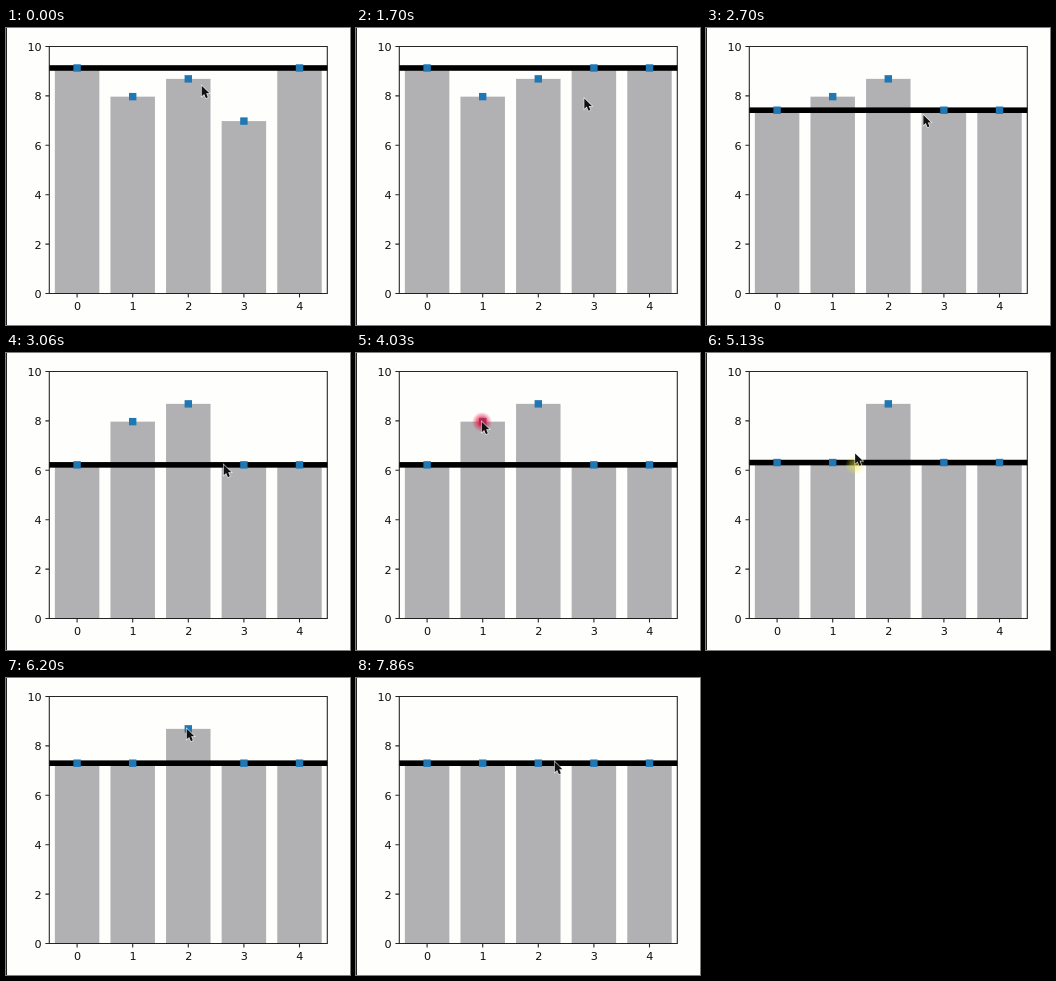
An HTML page with a canvas that plays this animation: 344 px wide and 297 px high, repeating every 8 s.

```html
<!DOCTYPE html>
<html lang="en">
<head>
<meta charset="utf-8">
<title>Bars and threshold</title>
<style>
  html, body { margin: 0; width: 100%; height: 100%; overflow: hidden; background: #fefefd; }
  canvas { display: block; }
</style>
</head>
<body>
<canvas width="344" height="297"></canvas>
<script>
const ctx = document.querySelector('canvas').getContext('2d');
const LOOP = 8000;
const SNAP_DELAY = 100;
const GLOW_TIME = 260;

const AXES = { left: 43.3, top: 18.5, width: 278, height: 247 };
AXES.bottom = AXES.top + AXES.height;
const STEP = AXES.width / 5;
const barX = i => AXES.left + STEP * (i + 0.5);
const valueY = v => AXES.bottom - v * AXES.height / 10;

// A clicked bar joins the line; a bar without a click is joined from the start.
const bars = [
  { value: 9.13 },
  { value: 7.97, click: 4030 },
  { value: 8.69, click: 7200 },
  { value: 6.98, click: 1060 },
  { value: 9.13 },
];
const dragClicks = [2200, 4900];
const clicks = [...dragClicks, ...bars.flatMap(bar => bar.click ?? [])];

const lineStart = { value: 9.13 };
const lineMoves = [
  { from: 2380, to: 3030, value: 6.22 },
  { from: 5095, to: 5630, value: 7.3 },
];

const cursorStart = { x: 195, y: 57 };
const cursorMoves = [
  { from: 30, to: 400, x: 232, y: 91 },
  { from: 545, to: 560, x: 236, y: 91 },
  { from: 1530, to: 2030, x: 216, y: 40 },
  { from: 2380, to: 2960, x: 217, y: 111 },
  { from: 3230, to: 3560, x: 112, y: 72 },
  { from: 3560, to: 3730, x: 125, y: 68 },
  { from: 4450, to: 4830, x: 148, y: 111 },
  { from: 4900, to: 5570, x: 149, y: 84 },
  { from: 5800, to: 6200, x: 180, y: 50 },
  { from: 7520, to: 7860, x: 198, y: 83 },
];

const easeOut = u => 1 - (1 - u) ** 1.3;

// Value of one property after all moves up to time t.
function follow(start, moves, key, t) {
  return moves.reduce((value, { from, to, [key]: goal }) => {
    const u = Math.min(1, Math.max(0, (t - from) / (to - from)));
    return value + (goal - value) * easeOut(u);
  }, start[key]);
}

const cursorAt = t => ['x', 'y'].map(key => follow(cursorStart, cursorMoves, key, t));

function drawAxes() {
  ctx.strokeStyle = 'rgba(0, 0, 0, 0.85)';
  ctx.fillStyle = '#111';
  ctx.lineWidth = 1.1;
  ctx.font = '11.2px "DejaVu Sans", sans-serif';
  ctx.beginPath();
  ctx.rect(AXES.left, AXES.top, AXES.width, AXES.height);
  ctx.textAlign = 'right';
  for (let v = 0; v <= 10; v += 2) {
    const y = valueY(v);
    ctx.moveTo(AXES.left - 3.9, y);
    ctx.lineTo(AXES.left, y);
    ctx.fillText(v, AXES.left - 7.6, y + 4.5);
  }
  ctx.textAlign = 'center';
  bars.forEach((bar, i) => {
    ctx.moveTo(barX(i), AXES.bottom);
    ctx.lineTo(barX(i), AXES.bottom + 3.9);
    ctx.fillText(i, barX(i) + 0.4, AXES.bottom + 16.8);
  });
  ctx.stroke();
}

// Red at the click, turning yellow as it fades.
function drawGlow(age, x, y) {
  const u = age / GLOW_TIME;
  const radius = 10;
  const color = alpha => `hsla(${347 + 80 * u}, 88%, ${48 + 12 * u}%, ${alpha * (1 - 0.5 * u)})`;
  const gradient = ctx.createRadialGradient(x, y, 0, x, y, radius);
  gradient.addColorStop(0, color(0.9));
  gradient.addColorStop(0.4, color(0.7));
  gradient.addColorStop(1, color(0));
  ctx.fillStyle = gradient;
  ctx.fillRect(x - radius, y - radius, 2 * radius, 2 * radius);
}

const arrow = new Path2D('M.8 .9V12.2L3.5 9.8L5.5 14.3L7.6 13.4L5.7 9H9.3Z');

function drawCursor(x, y) {
  ctx.save();
  ctx.translate(x, y);
  ctx.scale(0.9, 0.92);
  ctx.lineWidth = 1.4;
  ctx.strokeStyle = 'rgba(255, 255, 255, 0.8)';
  ctx.fillStyle = '#111';
  ctx.stroke(arrow);
  ctx.fill(arrow);
  ctx.restore();
}

function draw(t) {
  const lineY = valueY(follow(lineStart, lineMoves, 'value', t));
  const topOf = ({ value, click }) =>
    click === undefined || t >= click + SNAP_DELAY ? lineY : valueY(value);

  ctx.fillStyle = '#fefefd';
  ctx.fillRect(0, 0, 344, 297);
  ctx.fillStyle = '#222';
  ctx.fillRect(0, 0, 1, 297);

  ctx.fillStyle = '#b1b1b3';
  bars.forEach((bar, i) => {
    const top = topOf(bar);
    ctx.fillRect(barX(i) - STEP * 0.4, top, STEP * 0.8, AXES.bottom - top);
  });
  drawAxes();

  ctx.fillStyle = '#000';
  ctx.fillRect(AXES.left, lineY - 2.8, AXES.width, 5.6);
  ctx.fillStyle = '#1f77b4';
  bars.forEach((bar, i) => ctx.fillRect(barX(i) - 3.7, topOf(bar) - 3.7, 7.4, 7.4));

  for (const click of clicks) {
    const age = t - click;
    if (age < 0 || age >= GLOW_TIME) continue;
    const [x, y] = cursorAt(click);
    drawGlow(age, x + 1, y + 1);
  }
  drawCursor(...cursorAt(t));
}

const start = performance.now();
function tick() {
  draw((performance.now() - start) % LOOP);
  requestAnimationFrame(tick);
}
tick();
</script>
</body>
</html>
```
